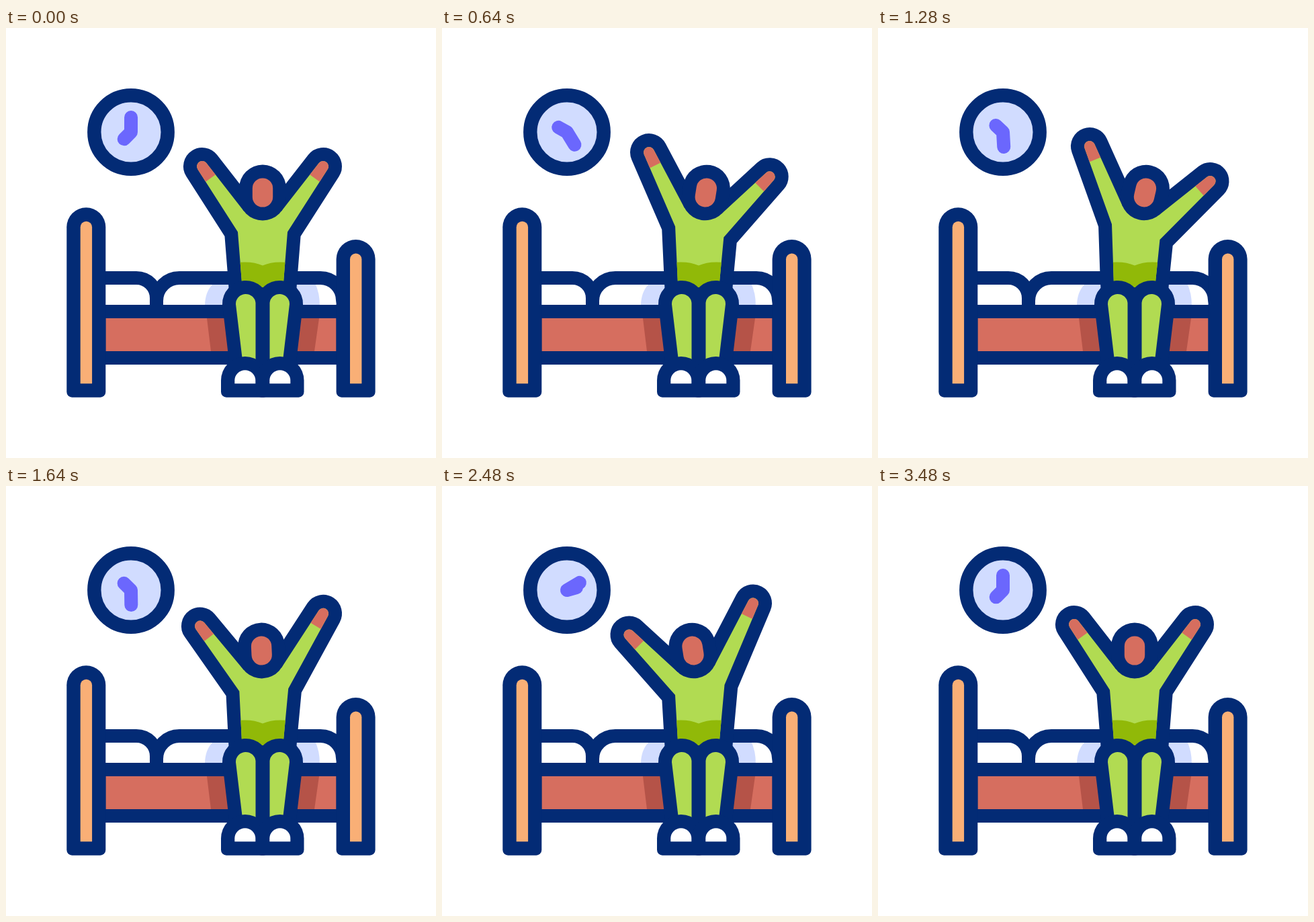
Write an HTML page with a canvas that moves like this. It is 640x640 px and loops after 3.6 s.

```html
<!DOCTYPE html>
<html lang="en">
<head>
<meta charset="utf-8">
<title>Morning stretch</title>
<style>
  html, body { margin: 0; width: 100%; height: 100%; overflow: hidden; background: #fff; }
  canvas { display: block; width: 640px; height: 640px; }
</style>
</head>
<body>
<canvas id="stage" width="640" height="640"></canvas>
<script>
const ctx = document.getElementById('stage').getContext('2d');
const LOOP = 3600;
const NAVY = '#032b75', PALE = '#d1dcff', VIOLET = '#6b67fd', GREEN = '#b1db52',
      MOSS = '#91b908', SKIN = '#d66e5f', BRICK = '#b55348', WOOD = '#f9af76';
const TIP = 8, HEAD = 35, LINE = 20;

// Each pose: arm tips, shoulders, head x and head tilt in degrees
const REST  = { tips: [[292, 206], [472, 206]], shoulders: [[345, 303.5], [419, 303.5]], head: [382, 0] };
const RIGHT = { tips: [[315, 176], [494.5, 228]], shoulders: [[348, 292], [419.5, 315]], head: [397.5, 13] };
const LEFT  = { tips: [[278.5, 221.5], [463, 174.5]], shoulders: [[347, 311], [420.5, 296]], head: [373.5, -9] };

const mix = (a, b, k) => Array.isArray(a) ? a.map((v, i) => mix(v, b[i], k)) : a + (b - a) * k;
const mixPose = (a, b, k) => Object.fromEntries(Object.keys(a).map(key => [key, mix(a[key], b[key], k)]));
const polar = ([x, y], r, angle) => [x + r * Math.cos(angle), y + r * Math.sin(angle)];
const angleTo = (a, b) => Math.atan2(b[1] - a[1], b[0] - a[0]);
const distance = (a, b) => Math.hypot(b[0] - a[0], b[1] - a[1]);

// Ease with horizontal end handles at x1 and x2
function ease(t, start, end, x1 = 0.4, x2 = 0.2) {
  const p = Math.min(1, Math.max(0, (t - start) / (end - start)));
  let lo = 0, hi = 1;
  for (let i = 0; i < 24; i++) {
    const m = (lo + hi) / 2, n = 1 - m;
    if (3 * n * n * m * x1 + 3 * n * m * m * x2 + m * m * m < p) lo = m; else hi = m;
  }
  return p === 1 ? 1 : lo * lo * (3 - 2 * lo);
}

function poseAt(t) {
  if (t < 1340) return mixPose(REST, RIGHT, ease(t, 0, 1200, 0.4, 0.4));
  if (t < 2525) return mixPose(RIGHT, LEFT, ease(t, 1340, 2000));
  return mixPose(LEFT, REST, ease(t, 2525, 3480));
}

// Minute hand angle in degrees; the hour hand turns at half the speed
function minuteAt(t) {
  if (t < 2124) return 180 * (1 - Math.exp(-Math.pow(t / 403, 1.2)));
  return 180 + 540 * ease(t, 2124, 3212);
}

function fill(color, path) {
  ctx.fillStyle = color;
  ctx.fill(path);
}

function stroke(color, width, path) {
  ctx.strokeStyle = color;
  ctx.lineWidth = width;
  ctx.stroke(path);
}

function box(color, x, y, w, h, radii = 0) {
  const path = new Path2D();
  path.roundRect(x, y, w, h, radii);
  fill(color, path);
}

function polyline(points) {
  const path = new Path2D();
  points.forEach(p => path.lineTo(...p));
  return path;
}

function drawClock(t) {
  const hub = [186, 155], minute = minuteAt(t);
  const face = new Path2D();
  face.arc(...hub, 54.7, 0, Math.PI * 2);
  fill(PALE, face);
  stroke(NAVY, 20.4, face);
  const hand = (length, degrees) => polar(hub, length, (degrees - 90) * Math.PI / 180);
  stroke(VIOLET, 20, polyline([hand(14.6, 225 + minute / 2), hub, hand(22, minute)]));
}

function drawPost(x, y) {
  box(NAVY, x, y, 58, 549.7 - y, [29, 29, 8, 8]);
  box(WOOD, x + 20.4, y + 20.5, 17.4, 508.7 - y, [8.7, 8.7, 0, 0]);
}

function drawBed() {
  fill(PALE, new Path2D('M296 414 Q296 392 309 380 H345 V414 Z M467 414 Q467 394 460 380 H415 V414 Z'));
  stroke(NAVY, LINE, new Path2D(
    'M140 372 H194 A30 30 0 0 1 224 402 V422 M224 422 V406 A34 34 0 0 1 258 372 H468 A33 33 0 0 1 501 405'));
  box(NAVY, 140, 412, 360, 89);
  box(SKIN, 148.5, 432, 343, 49);
  fill(BRICK, new Path2D('M299 432 H335 V481 H305 Z M430 432 H466 L459 481 H430 Z'));
  drawPost(90.3, 267.3);
  drawPost(491.6, 315);
}

// Arm edges touch the round hand on one side and the head outline on the other
function armShape(tip, shoulder, neck, side) {
  const inner = angleTo(tip, neck) + side * Math.acos((TIP + HEAD) / distance(tip, neck));
  const outer = angleTo(tip, shoulder) - side * Math.acos(TIP / distance(tip, shoulder));
  const collar = polar(neck, -HEAD, inner);
  const a = angleTo(tip, shoulder), b = angleTo(tip, collar);
  const axis = Math.atan2(Math.sin(a) + Math.sin(b), Math.cos(a) + Math.cos(b));
  return { tip, shoulder, inner, outer, collar, axis };
}

function drawUpperBody(pose) {
  const [headX, degrees] = pose.head, tilt = degrees * Math.PI / 180;
  const crown = polar([headX, 245], 6.4, tilt - Math.PI / 2);
  const neck = polar([headX, 245], 6.4, tilt + Math.PI / 2);
  const [l, r] = [0, 1].map(i => armShape(pose.tips[i], pose.shoulders[i], neck, i ? 1 : -1));

  const body = new Path2D();
  body.moveTo(351.5, 386);
  body.lineTo(350.8, 376);
  body.lineTo(...l.shoulder);
  body.arc(...l.tip, TIP, l.outer, l.inner);
  body.lineTo(...l.collar);
  body.lineTo(...r.collar);
  body.arc(...r.tip, TIP, r.inner, r.outer);
  body.lineTo(...r.shoulder);
  body.lineTo(413.2, 376);
  body.lineTo(412.5, 386);
  body.closePath();
  stroke(NAVY, LINE * 2, body);
  fill(GREEN, body);

  ctx.save();
  ctx.clip(body);
  fill(MOSS, new Path2D('M340 349.5 Q366 346 382 353.5 Q398 346 424 349.5 V390 H340 Z'));
  for (const arm of [l, r]) {
    ctx.save();
    ctx.translate(...arm.tip);
    ctx.rotate(arm.axis);
    box(SKIN, -20, -24, 41.5, 48);
    ctx.restore();
  }
  ctx.restore();

  const head = polyline([crown, neck]);
  stroke(NAVY, HEAD * 2, head);
  stroke(SKIN, 30.4, head);
}

function drawLegs() {
  const legs = new Path2D(
    'M371.5 495 V409 A14.8 14.8 0 0 0 342 411 L352 495 Z M392.5 495 V409 A14.8 14.8 0 0 1 422 411 L412 495 Z');
  stroke(NAVY, LINE * 2, legs);
  fill(GREEN, legs);
  box(NAVY, 320, 489, 71.5, 60.7, [35.5, 35.5, 8, 8]);
  box(NAVY, 372, 489, 71.5, 60.7, [35.5, 35.5, 8, 8]);
  box('#fff', 340.3, 509.3, 31, 19.9, [15.5, 15.5, 0, 0]);
  box('#fff', 392.3, 509.3, 31, 19.9, [15.5, 15.5, 0, 0]);
}

function draw(t) {
  ctx.fillStyle = '#fff';
  ctx.fillRect(0, 0, 640, 640);
  ctx.lineJoin = 'round';
  ctx.lineCap = 'round';
  drawClock(t);
  drawBed();
  drawUpperBody(poseAt(t));
  drawLegs();
}

const begin = performance.now();
function tick() {
  draw((performance.now() - begin) % LOOP);
  requestAnimationFrame(tick);
}
tick();
</script>
</body>
</html>
```
